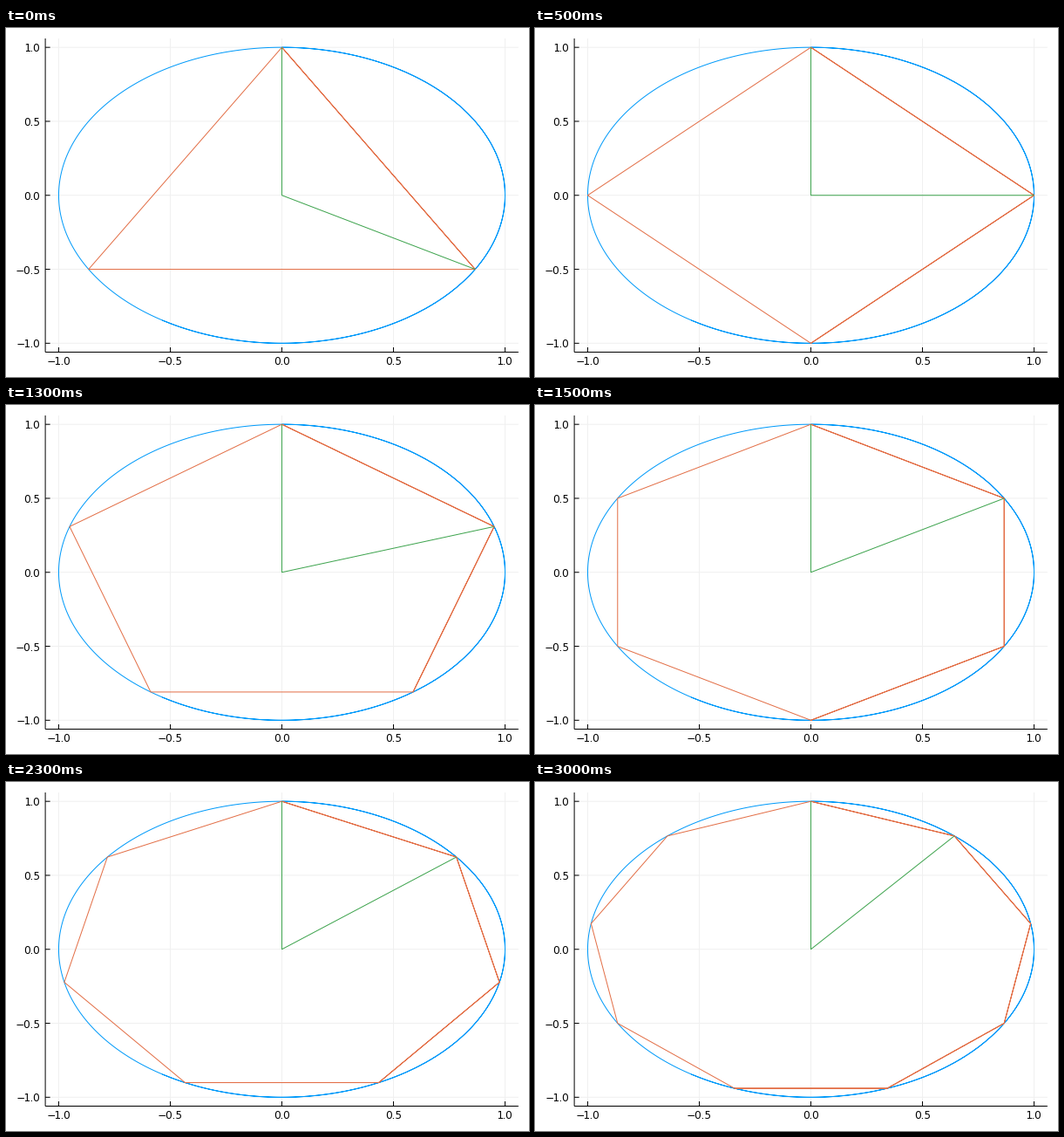
A matplotlib script that plays this animation: 600x400 px, repeating every 3.5 s.

```python
import numpy as np
import matplotlib.pyplot as plt
from matplotlib.animation import FuncAnimation

W, H, DPI = 600, 400, 100
PX = 72 / DPI  # one pixel in points
LEFT, RIGHT, TOP, BOTTOM = 45.1, 587.9, 12.0, 371.5
LIMIT = 1.06
SWEEP = 10  # radians traced, so part of each outline is drawn twice
BLUE, ORANGE, GREEN = "#009afa", "#e36f47", "#3ea44e"
TICKS = [-1, -0.5, 0, 0.5, 1]
LABELS = [f"{t:.1f}".replace("-", "\u2212") for t in TICKS]

plt.rcParams.update({
    "font.family": "DejaVu Sans",
    "text.hinting": "force_autohint",
    "text.hinting_factor": 1,
    "path.simplify": False,
})
fig = plt.figure(figsize=(W / DPI, H / DPI), dpi=DPI, facecolor="white")
ax = fig.add_axes([LEFT / W, 1 - BOTTOM / H, (RIGHT - LEFT) / W, (BOTTOM - TOP) / H])
ax.set(xlim=(-LIMIT, LIMIT), ylim=(-LIMIT, LIMIT))
ax.set_xticks(TICKS, LABELS)
ax.set_yticks(TICKS, LABELS)
ax.tick_params(length=0, labelsize=11.7 * PX)
ax.tick_params(axis="x", pad=4.5 * PX)
ax.tick_params(axis="y", pad=6 * PX)
ax.spines[:].set_visible(False)


def add_line(color, x=(), y=()):
    return ax.plot(x, y, color=color, linewidth=PX, snap=False,
                   solid_capstyle="butt", clip_on=False)[0]


def add_axes_lines():
    span = [-LIMIT, LIMIT]
    tick_x = [-LIMIT, -LIMIT + 5.5 * 2 * LIMIT / (RIGHT - LEFT)]
    tick_y = [-LIMIT, -LIMIT + 5.5 * 2 * LIMIT / (BOTTOM - TOP)]
    for color, xs, ys in (("#f0f0f0", span, span), ("black", tick_x, tick_y)):
        for t in TICKS:
            add_line(color, xs, [t, t])
            add_line(color, [t, t], ys)
    add_line("black", span, [-LIMIT, -LIMIT])
    add_line("black", [-LIMIT, -LIMIT], span)


def on_circle(angle):
    """Points on the unit circle, clockwise from the top."""
    return np.sin(angle), np.cos(angle)


add_axes_lines()
circle = add_line(BLUE, *on_circle(np.arange(0, SWEEP, 0.01)))
polygon = add_line(ORANGE)
wedge = add_line(GREEN)


def draw(frame):
    step = 2 * np.pi / (frame + 3)
    polygon.set_data(*on_circle(np.arange(0, SWEEP, step)))
    x, y = on_circle(step)
    wedge.set_data([0, 0, x], [1, 0, y])
    return polygon, wedge


anim = FuncAnimation(fig, draw, frames=7, interval=500, repeat=True, repeat_delay=0)
plt.show()
```
